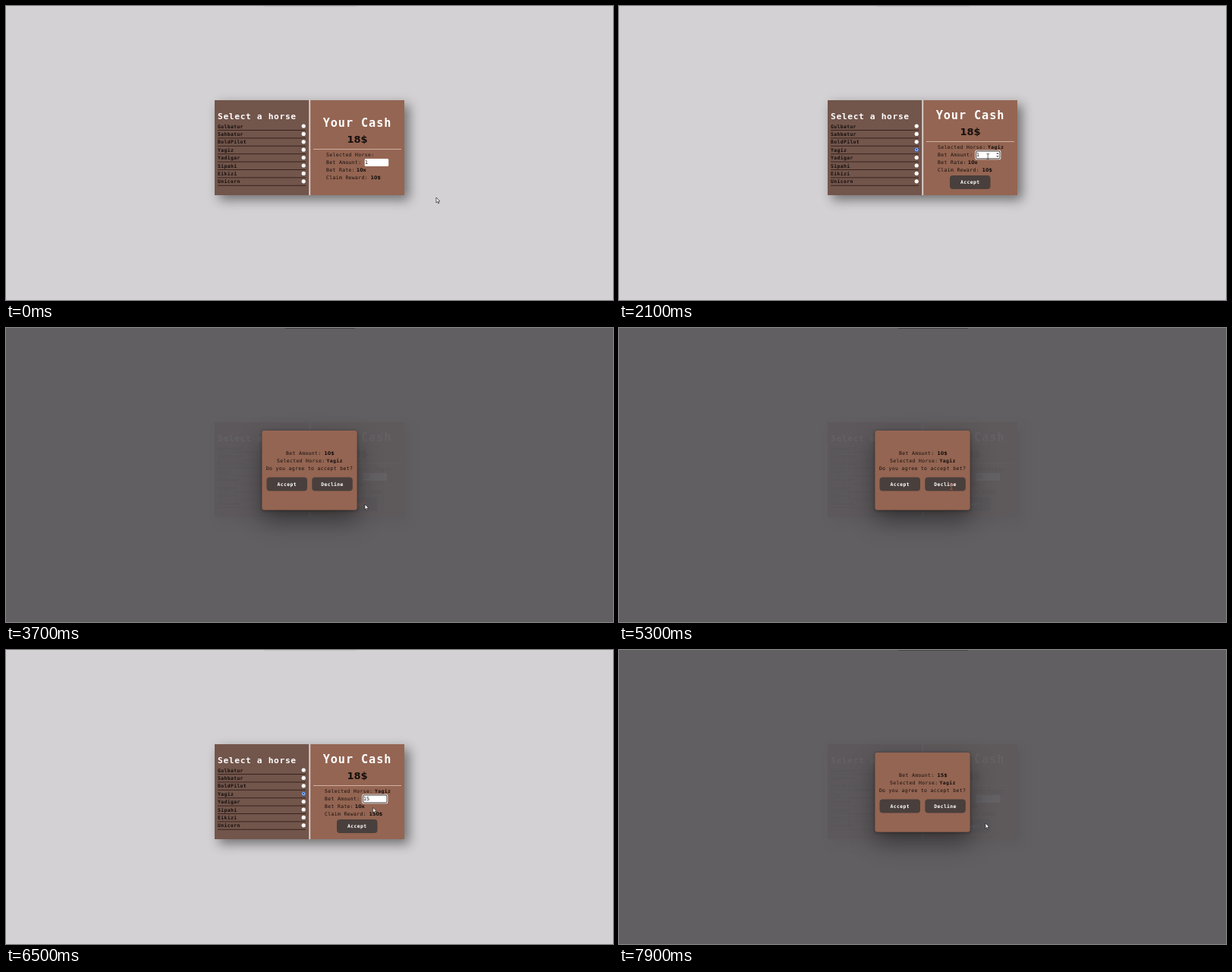
Write an HTML page with a canvas that moves like this. It is 800 px wide and 387 px high and loops after 8000 ms.

```html
<!DOCTYPE html>
<html lang="en">
<head>
<meta charset="utf-8">
<title>Horse betting</title>
<style>
  html, body { margin: 0; width: 100%; height: 100%; overflow: hidden; background: #d3d1d3; }
  canvas { display: block; width: 800px; height: 387px; }
</style>
</head>
<body>
<canvas id="stage" width="800" height="387"></canvas>
<script>
const ctx = document.getElementById('stage').getContext('2d');
const LOOP = 8000, STEP = 100;
const LETTERS = '"DejaVu Sans Mono", monospace', DIGITS = '"DejaVu Sans", sans-serif';
const PAGE = '#d3d1d3', DARK = '#72554b', BROWN = '#946552', BUTTON = '#493f3c', INK = '#160f0d';
const HORSES = ['Gulbatur', 'Sahbatur', 'BoldPilot', 'Yagiz', 'Yadigar', 'Sipahi', 'Eikizi', 'Unicorn'];
const PICK = 3;

// Pointer waypoints: time, x, y
const PATH = [
  [0, 567, 252], [200, 560, 250], [900, 395, 192], [1000, 392, 188], [1300, 392, 188],
  [1900, 486, 198], [2800, 487, 198], [3400, 473, 232], [4100, 473, 232],
  [5000, 438, 209], [5400, 438, 209], [5900, 484, 196], [6300, 484, 196],
  [6800, 483, 228], [8000, 483, 228]
];
const CLICKS = [1100, 1900, 3600, 5300, 5900, 7600];

const within = (t, a, b) => t >= a && t < b;

function pointerAt(t) {
  const i = Math.max(1, PATH.findIndex(p => p[0] > t));
  const [t0, x0, y0] = PATH[i - 1], [t1, x1, y1] = PATH[i];
  const k = (t - t0) / (t1 - t0), e = k * k * (3 - 2 * k);
  return { x: x0 + (x1 - x0) * e, y: y0 + (y1 - y0) * e };
}

function stateAt(t) {
  const picked = t >= 1100;
  const modal = within(t, 3700, 5400) || t >= 7700;
  const amount = t < 2500 ? '1' : t < 6100 ? '10' : t < 6200 ? '1' : '15';
  const focused = within(t, 1900, 3600) || within(t, 5900, 7600);
  return { picked, modal, amount, focused };
}

function box(x, y, w, h, r, color) {
  ctx.fillStyle = color;
  ctx.beginPath();
  ctx.roundRect(x, y, w, h, r);
  ctx.fill();
}

function disc(x, y, r, color) {
  ctx.fillStyle = color;
  ctx.beginPath();
  ctx.arc(x, y, r, 0, 7);
  ctx.fill();
}

// y is the middle of the capitals
function text(str, x, y, { size = 6.4, bold = false, color = INK, align = 'left' } = {}) {
  const numeric = /^\d/.test(str);
  ctx.font = `${bold ? 'bold ' : ''}${size}px ${numeric ? DIGITS : LETTERS}`;
  ctx.letterSpacing = numeric ? '0px' : size * 0.06 + 'px';
  ctx.fillStyle = color;
  ctx.textAlign = align;
  ctx.fillText(str, x, y + size * 0.365);
}

function shadowed(color, blur, dx, dy, draw) {
  ctx.save();
  ctx.shadowColor = color;
  ctx.shadowBlur = blur;
  ctx.shadowOffsetX = dx;
  ctx.shadowOffsetY = dy;
  draw();
  ctx.restore();
}

function button(label, x, y) {
  box(x, y, 53.5, 18, 4, BUTTON);
  text(label, x + 26.7, y + 9, { bold: true, color: '#fff', align: 'center' });
}

function drawHorses(picked) {
  text('Select a horse', 279, 144.7, { size: 11.2, bold: true, color: '#fff' });
  HORSES.forEach((name, i) => {
    const y = 158 + i * 10.4;
    text(name, 279, y + 0.3, { bold: true });
    ctx.fillStyle = '#35251f';
    ctx.fillRect(279, y + 5, 116, 1);
    const on = picked && i === PICK;
    disc(392.2, y, 2.6, on ? '#2462d0' : '#fff');
    if (on) {
      disc(392.2, y, 2, '#fff');
      disc(392.2, y, 1.4, '#2462d0');
    }
  });
}

function drawInput(x, y, s, hover) {
  if (s.focused) {
    box(x - 1.4, y - 1.2, 34, 12.4, 2.5, '#fff');
    box(x - 0.5, y - 0.4, 32.2, 10.8, 2, '#3a302d');
    box(x + 0.4, y + 0.5, 30.4, 9, 1.2, '#fff');
  } else {
    box(x, y, 31.5, 10, 1.5, '#fff');
  }
  text(s.amount, x + 0.3, y + 5);
  if (hover) {
    ctx.fillStyle = '#555';
    for (const d of [-1, 1]) {
      ctx.beginPath();
      ctx.moveTo(x + 26.5, y + 5 + d);
      ctx.lineTo(x + 30, y + 5 + d);
      ctx.lineTo(x + 28.25, y + 5 + d * 3);
      ctx.fill();
    }
  }
}

function drawCash(s, hover) {
  const up = s.picked ? -10 : 0, x = s.picked ? 420 : 422;
  text('Your Cash', 463, 153 + up, { size: 15.2, bold: true, color: '#fff', align: 'center' });
  text('18$', 463, 175 + up, { size: 13, bold: true, align: 'center' });
  ctx.fillStyle = '#cfb0a4';
  ctx.fillRect(405, 188 + up, 116, 1);
  text('Selected Horse:', x, 196 + up);
  if (s.picked) text(HORSES[PICK], 486, 186, { bold: true });
  text('Bet Amount:', x, 206 + up);
  drawInput(x + 50.7, 201 + up, s, hover);
  text('Bet Rate:', x, 216 + up);
  text('10x', x + 39.7, 216 + up, { bold: true });
  text('Claim Reward:', x, 226 + up);
  text(s.amount * 10 + '$', x + 58.5, 226 + up, { bold: true });
  if (s.picked) button('Accept', 436, 223);
}

function drawPage(s, hover) {
  ctx.fillStyle = PAGE;
  ctx.fillRect(0, 0, 800, 387);
  ctx.fillStyle = '#c4c2c4';
  ctx.fillRect(340, 0, 122, 1);
  shadowed('rgba(0,0,0,.47)', 14, 6, 6, () => box(275, 124, 250, 125, 0, DARK));
  box(401, 124, 124, 125, 0, BROWN);
  box(399.2, 124, 2, 125, 0, '#d8cdca');
  drawHorses(s.picked);
  drawCash(s, hover);
}

function drawModal(amount) {
  ctx.fillStyle = 'rgba(91,89,92,.95)';
  ctx.fillRect(0, 0, 800, 387);
  ctx.fillStyle = '#454346';
  ctx.fillRect(368, 0, 92, 1);
  shadowed('rgba(0,0,0,.4)', 32, 0, 14, () => box(337.5, 135, 125, 104.5, 3, BROWN));
  shadowed('rgba(0,0,0,.4)', 4, 0, 1, () => box(337.5, 135, 125, 104.5, 3, BROWN));
  text('Bet Amount:', 369, 164.5);
  text(amount + '$', 419.3, 164.5, { bold: true });
  text('Selected Horse:', 357, 174.5);
  text(HORSES[PICK], 422.5, 174.5, { bold: true });
  text('Do you agree to accept bet?', 400, 184.5, { align: 'center' });
  button('Accept', 343.5, 196.5);
  button('Decline', 403.3, 196.5);
}

function polygon(x, y, points) {
  ctx.beginPath();
  points.forEach(([px, py]) => ctx.lineTo(x + px, y + py));
  ctx.closePath();
  ctx.fillStyle = '#fff';
  ctx.strokeStyle = '#222';
  ctx.lineWidth = 0.7;
  ctx.fill();
  ctx.stroke();
}

const ARROW = [[0, 0], [0, 7], [1.6, 5.5], [2.7, 8], [3.8, 7.5], [2.7, 5.1], [4.8, 5]];
const HAND = [[-1.2, -1], [0, -1.3], [0.5, 1.8], [3, 2.4], [3, 5.5], [1.8, 8], [-1.4, 8], [-3.4, 4.4], [-2.6, 3.6], [-1.2, 4.6]];

function ibeam(x, y, color) {
  ctx.fillStyle = color;
  ctx.fillRect(x - 0.4, y - 3.5, 0.9, 7);
  ctx.fillRect(x - 1.8, y - 3.7, 3.7, 0.8);
  ctx.fillRect(x - 1.8, y + 3, 3.7, 0.8);
}

function drawPointer(t, s, p, hover) {
  const click = CLICKS.find(c => within(t, c, c + 200));
  const overText = hover || within(t, 4900, 5700);
  if (click !== undefined && !overText) {
    if (t === click) disc(p.x - 1, p.y, 4.5, 'rgba(135,35,15,.75)');
    else {
      ctx.strokeStyle = 'rgba(150,60,45,.5)';
      ctx.lineWidth = 0.8;
      ctx.beginPath();
      ctx.arc(p.x - 1, p.y + 1, 5, 0, 7);
      ctx.stroke();
    }
  }
  if (overText) {
    const color = s.modal ? '#c4573f' : hover ? '#555' : 'rgba(60,40,34,.35)';
    ibeam(p.x, p.y, color);
  } else if (!s.modal && (within(t, 1000, 1400) || within(t, 3300, 3700) || t >= 6700)) {
    polygon(p.x, p.y, HAND);
  } else {
    polygon(p.x, p.y, ARROW);
  }
}

function render(t) {
  const s = stateAt(t), p = pointerAt(t);
  const hover = !s.modal && s.picked && within(p.x, 470, 503) && within(p.y, 190, 202);
  drawPage(s, hover);
  if (s.modal) drawModal(s.amount);
  drawPointer(t, s, p, hover);
}

function tick() {
  const t = performance.now() % LOOP;
  render(Math.floor(t / STEP) * STEP);
  requestAnimationFrame(tick);
}
tick();
</script>
</body>
</html>
```
